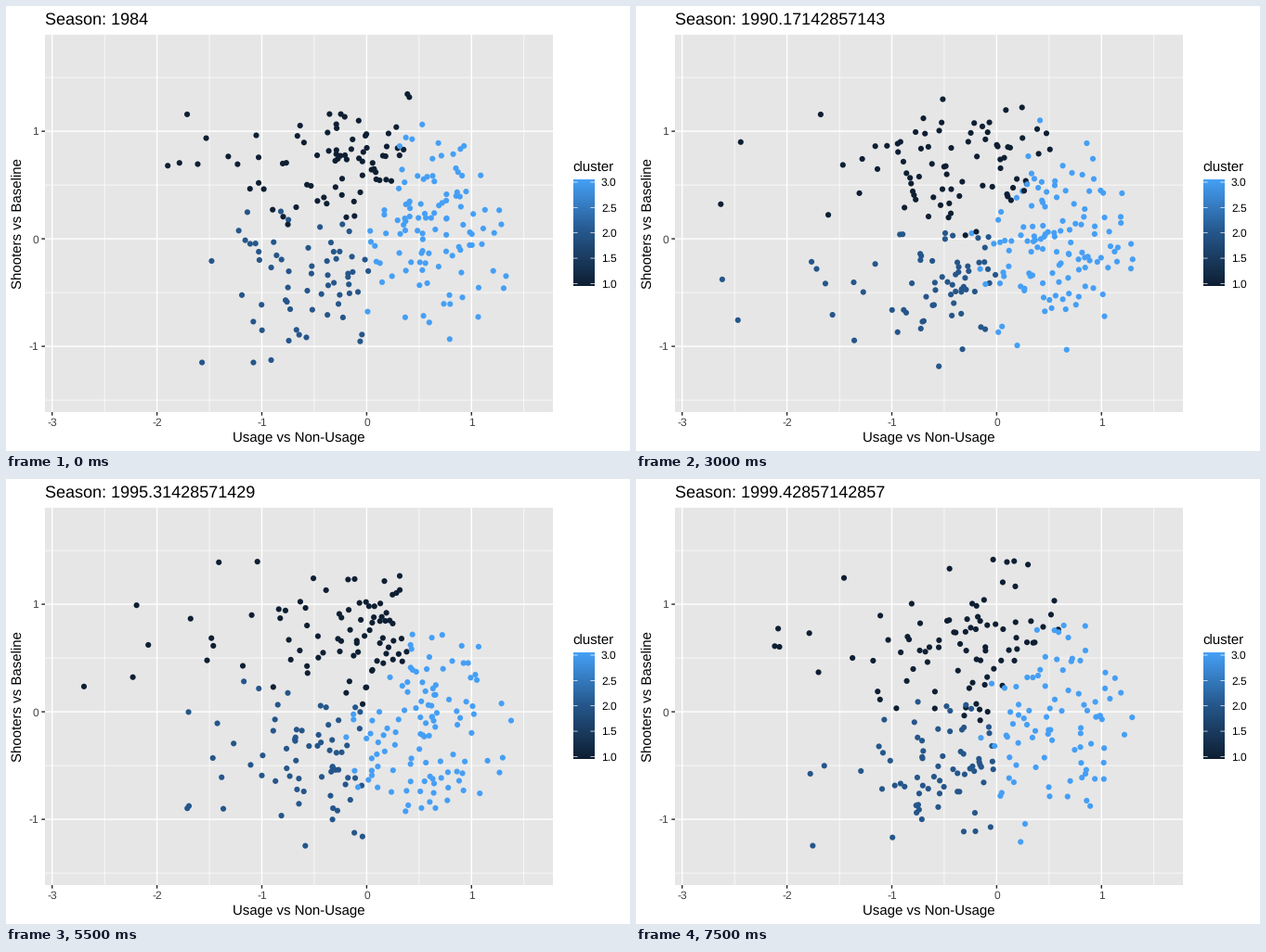
These frames come from a looping animation (672x480 px, 8 s). A matplotlib script:

```python
import numpy as np
import matplotlib.pyplot as plt
from matplotlib.animation import FuncAnimation
from matplotlib.colors import LinearSegmentedColormap
from matplotlib.patches import Rectangle

W, H, DPI = 672, 480, 96
FRAMES, STEP_MS = 16, 500
LEFT, RIGHT, TOP, BOTTOM = 42, 589, 31, 438
COLORS = np.array(["#0e1f33", "#25568a", "#459ff5"])

plt.rcParams["font.family"] = "Liberation Sans"
plt.rcParams["text.hinting"] = "none"
plt.rcParams["text.hinting_factor"] = 1


def px(x):
    return 388.4 + 112.9 * np.asarray(x)


def py(y):
    return 251.1 - 116 * np.asarray(y)


def candidate(rng, cluster, t):
    """One possible position in a cluster's cloud; t is progress, 0 to 1."""
    if cluster == 0:
        return 0.6 - rng.gamma(2.1, 0.46), rng.normal(0.68, 0.33)
    if cluster == 1:
        return 0.1 - rng.gamma(2.6, 0.28), rng.normal(-0.3 - 0.22 * t, 0.38)
    return rng.normal(0.62 - 0.14 * t, 0.4), rng.normal(0.1 - 0.3 * t, 0.52)


def inside(x, y, cluster, t):
    """Outer limits: a long left tail and a rounded right side."""
    if cluster == 2:
        return (x / 1.42) ** 2 + ((y + 0.1 * t) / 1.2) ** 2 < 1
    return x > -2.75 and -1.18 - 0.15 * t < y < 1.4 + 0.1 * t


def season_cloud(i):
    """Positions and cluster numbers for step i."""
    rng = np.random.default_rng(1984 + i)
    t = i / (FRAMES - 1)
    centers = np.array([(-0.45, 0.68),
                        (-0.7, -0.32 - 0.23 * t),
                        (0.6 - 0.1 * t, 0.05 - 0.25 * t)])
    counts = (76 + round(8 * t), 62 + round(6 * t),
              108 + round(25 * np.sin(np.pi * t) - 20 * t))
    pts = []
    for k, count in enumerate(counts):
        group = []
        while len(group) < count:
            p = candidate(rng, k, t)
            dist = np.hypot(*(centers - p).T)
            if dist[k] - dist.min() < 0.2 and inside(*p, k, t):
                group.append(p)
        pts += group
    order = rng.permutation(len(pts))
    return np.array(pts)[order], np.repeat([0, 1, 2], counts)[order]


fig = plt.figure(figsize=(W / DPI, H / DPI), dpi=DPI, facecolor="white")
ax = fig.add_axes([0, 0, 1, 1])
ax.set_axis_off()


def line(xs, ys, color, width, z):
    ax.plot(xs, ys, color=color, lw=width * 72 / DPI, zorder=z,
            solid_capstyle="butt", snap=False)


def label(x, y, text, size, color="black", **kw):
    return ax.text(x, y, text, fontsize=size, color=color, **kw)


def x_line(v, width, z):
    line([px(v)] * 2, [TOP, BOTTOM], "white", width, z)


def y_line(v, width, z):
    line([LEFT, RIGHT], [py(v)] * 2, "white", width, z)


# Panel, grid and axes
ax.add_patch(Rectangle((LEFT, TOP), RIGHT - LEFT, BOTTOM - TOP,
                       fc="#e6e6e6", ec="none", zorder=0))
for v in np.arange(-2.5, 2):
    x_line(v, 0.71, 1)
for v in np.arange(-1.5, 2):
    y_line(v, 0.71, 1)
for v in range(-3, 2):
    x_line(v, 1.42, 2)
    line([px(v)] * 2, [BOTTOM, BOTTOM + 3.7], "#2b2b2b", 1.42, 2)
    label(px(v), 453, f"{v}", 8.8, "#424242", ha="center")
for v in range(-1, 2):
    y_line(v, 1.42, 2)
    line([LEFT - 3.7, LEFT], [py(v)] * 2, "#2b2b2b", 1.42, 2)
    label(35.2, py(v) + 4.3, f"{v}", 8.8, "#424242", ha="right")

label((LEFT + RIGHT) / 2, 470, "Usage vs Non-Usage", 11, ha="center")
label(18, (TOP + BOTTOM) / 2, "Shooters vs Baseline", 11, rotation=90,
      rotation_mode="anchor", ha="center", va="baseline")
title = label(LEFT - 0.5, 20, "", 13.2)

# Colour bar
ramp = LinearSegmentedColormap.from_list("ramp", list(COLORS))
bar_l, bar_r, bar_t, bar_b = 611, 634, 187, 302
ax.imshow(np.linspace(1, 0, 116)[:, None], cmap=ramp, aspect="auto",
          extent=(bar_l, bar_r, bar_b, bar_t), zorder=2)
label(610.5, 179, "cluster", 11)
for n in range(5):
    y = 190 + 27.35 * n
    line([bar_l, bar_l + 4.6], [y, y], "white", 0.71, 3)
    line([bar_r - 4.6, bar_r], [y, y], "white", 0.71, 3)
    label(641, y + 4.3, f"{3 - n / 2:.1f}", 8.8)

dots = ax.scatter([], [], s=(6.15 * 72 / DPI) ** 2, linewidths=0, zorder=4)
ax.set_xlim(0, W)
ax.set_ylim(H, 0)


def update(i):
    pts, kinds = season_cloud(i)
    dots.set_offsets(np.column_stack([px(pts[:, 0]), py(pts[:, 1])]))
    dots.set_facecolor(COLORS[kinds])
    title.set_text(f"Season: {1984 + i * 36 / 35:.15g}")
    return dots, title


anim = FuncAnimation(fig, update, frames=FRAMES, interval=STEP_MS,
                     repeat=True, repeat_delay=0, blit=False)
plt.show()
```
